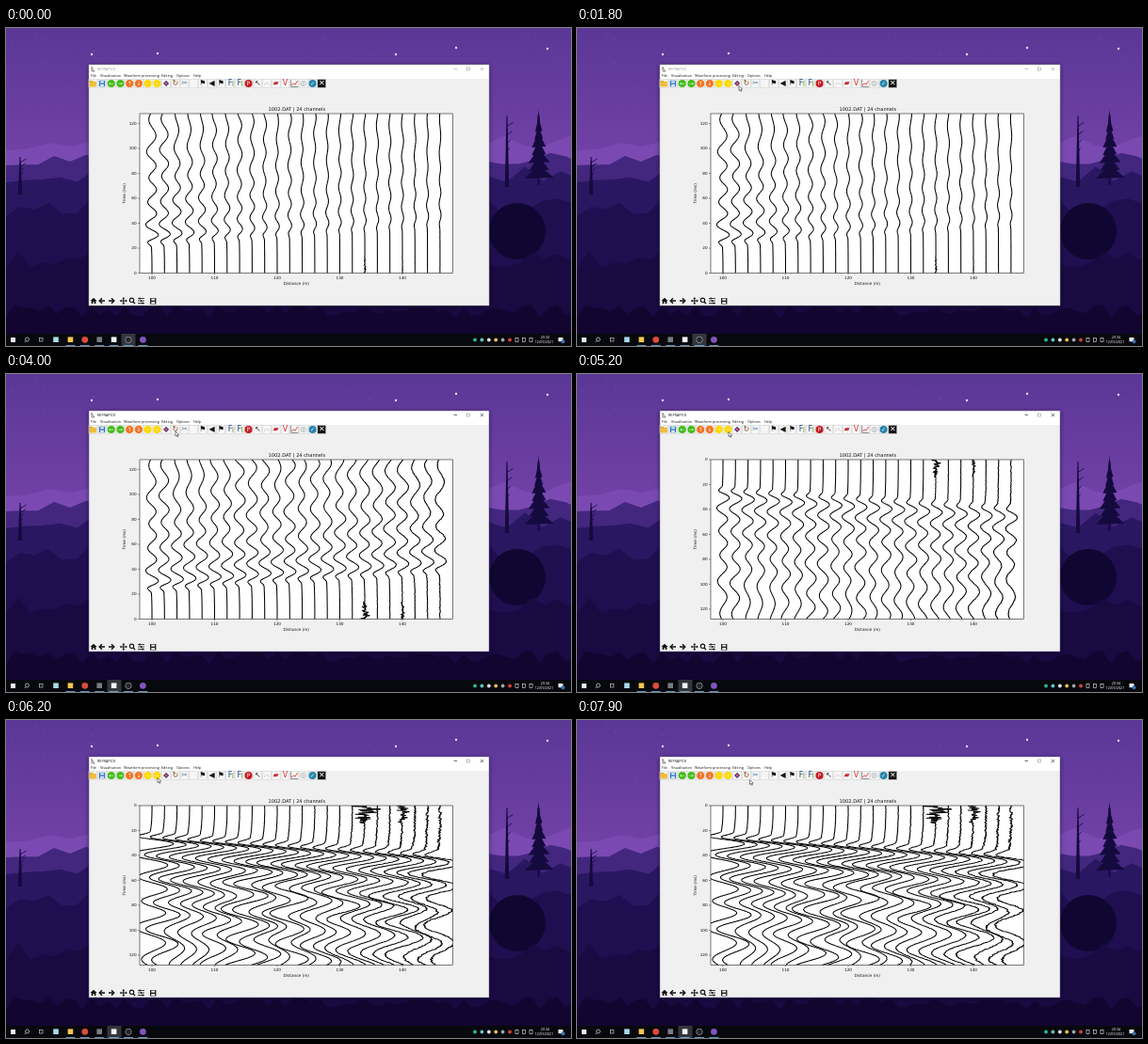
Write an HTML page with a canvas that moves like this. It is 600 px wide and 338 px high and loops after 8 s.

```html
<!DOCTYPE html>
<html lang="en">
<head>
<meta charset="utf-8">
<title>Seismic traces</title>
<style>
html,body{margin:0;width:100%;height:100%;overflow:hidden;background:#1b0c3c}
canvas{display:block;width:600px;height:338px}
</style>
</head>
<body>
<canvas id="stage" width="600" height="338"></canvas>
<script>
const c = document.getElementById('stage').getContext('2d');
const SANS = '"Open Sans",sans-serif', PLOT = '"DejaVu Sans",sans-serif';
const L = 142, R = 474.5, T = 91, B = 260.5, SPAN = 128, MS = (B - T) / SPAN;
const CHANNELS = 24, RATE = 4;
const clamp = v => Math.max(0, Math.min(1, v));
const ease = k => k * k * (3 - 2 * k);

function rect(x, y, w, h, col) { c.fillStyle = col; c.fillRect(x, y, w, h); }
function frame(x, y, w, h, col, width = .6) { c.strokeStyle = col; c.lineWidth = width; c.strokeRect(x, y, w, h); }
function dot(x, y, r, col) { c.fillStyle = col; c.beginPath(); c.arc(x, y, r, 0, 7); c.fill(); }
function ring(x, y, r, col, w = .8) { c.strokeStyle = col; c.lineWidth = w; c.beginPath(); c.arc(x, y, r, 0, 7); c.stroke(); }
function trail(p) {
  c.beginPath();
  for (let i = 0; i < p.length; i += 2) c.lineTo(p[i], p[i + 1]);
}
function poly(col, ...p) { trail(p); c.fillStyle = col; c.fill(); }
function line(col, w, ...p) { trail(p); c.strokeStyle = col; c.lineWidth = w; c.stroke(); }
function text(s, x, y, size, font = SANS, align = 'left', col = '#111') {
  c.font = size + 'px ' + font; c.textAlign = align; c.textBaseline = 'middle';
  c.fillStyle = col; c.fillText(s, x, y);
}
function random(seed) {
  return () => (seed = (seed * 16807) % 2147483647) / 2147483647;
}

// Unit-gain displacement of one channel: a chirp after the first arrival plus noise
const rnd = random(4711);
function makeTrace(ch) {
  const arrival = 27 + ch * .66, a = 14.8, b = 1.2, shift = rnd() * 6;
  const hiss = .04 + .5 * (ch / CHANNELS) ** 4;
  const burst = ch == 17 ? 6 : ch == 20 ? 3 : 0;
  let rough = 0;
  return Array.from({length: SPAN * RATE + 1}, (_, i) => {
    const t = i / RATE, tau = (t - arrival) / (1 + ch * .005);
    const n = tau < 0 ? tau / a : (Math.sqrt(a * a + 4 * b * tau) - a) / (2 * b);
    const rise = ease(clamp((n + .45) / .45)), late = clamp(tau / 40);
    const wave = 7 * (.55 + .45 * Math.exp(-Math.max(0, tau) / 35)) * Math.sin(2 * Math.PI * n + .3 * late * Math.sin(shift + t / 13));
    const ripple = late * (Math.sin(t / 4 + shift) + Math.sin(t / 9 - ch * .5));
    const noise = rnd() * 2 - 1;
    rough = rough * .5 + noise * .5;
    const spike = t < 14 ? burst * noise * (.3 + .7 * noise * noise) * Math.exp(-t / 14) : 0;
    const lean = -1.2 * (1 - rise) * Math.min(1, t / arrival) ** 3;
    return rise * (wave + ripple) + lean + hiss * rough * 1.5 + spike;
  });
}
const traces = Array.from({length: CHANNELS}, (_, ch) => makeTrace(ch));

function hill(col, seed, y, height, step) {
  const r = random(seed);
  c.fillStyle = col; c.beginPath(); c.moveTo(0, 338);
  for (let x = 0; x <= 600 + step; x += step) c.lineTo(x, y - r() * height);
  c.lineTo(620, 338); c.fill();
}
function pine(x, y, h, w, col) {
  rect(x - 1, y, 2, h + 8, col);
  for (let i = 1; i < 9; i++) {
    const k = i / 8, s = w * k * (i % 2 ? .8 : 1);
    poly(col, x, y + h * (k - .22), x + s, y + h * k, x - s * .9, y + h * k + 1);
  }
}
function bareTree(x, y, h, col) {
  poly(col, x - .5, y, x + .5, y, x + 2.2, y + h, x - 2.2, y + h);
  for (let k = .15; k < .7; k += .12) {
    const side = Math.sin(k * 50) * 7;
    line(col, .8, x, y + h * k, x + side, y + h * k - 4);
  }
}
function wallpaper() {
  const sky = c.createLinearGradient(0, 0, 0, 150);
  sky.addColorStop(0, '#5b3796');
  sky.addColorStop(1, '#7442a8');
  rect(0, 0, 600, 338, sky);
  const r = random(12);
  for (let i = 0; i < 16; i++) dot(r() * 600, r() * 75, .4, '#a982cc');
  for (const [x, y] of [[91, 28], [161, 27], [414, 28], [478, 21], [575, 22]]) dot(x, y, 1.2, '#ecd6fa');
  hill('#7a4ab2', 31, 130, 18, 23);
  hill('#43277f', 8, 146, 15, 17);
  hill('#2a1762', 77, 164, 17, 19);
  bareTree(532, 93, 76, '#150a3d');
  pine(565.5, 93, 66, 16, '#150a3d');
  bareTree(15, 137, 40, '#150a3d');
  hill('#1f0f50', 19, 200, 20, 15);
  dot(543, 216, 30, '#100632');
  hill('#190a42', 53, 255, 18, 13);
  hill('#120530', 91, 308, 14, 9);
}

// Tool buttons: glyph, ink, and the disc behind it if there is one
const tools = [
  ['folder'], ['disk', '#2a78c8'], ['←', '#fff', '#43bd18'], ['→', '#fff', '#43bd18'],
  ['↑', '#fff', '#f4711f'], ['↓', '#fff', '#f4711f'], ['−', '#fff3a0', '#ffd800'], ['+', '#fff3a0', '#ffd800'],
  ['◆', '#3e2b78'], ['↻', '#7a4312'], ['✂', '#54779e'], [''], ['⚑', '#111'], ['◀', '#111'], ['⚑', '#111'],
  ['F', '#244b87'], ['F', '#244b87'], ['P', '#fff', '#c51820'], ['↖', '#333'], ['⌒', '#bbb'],
  ['▰', '#c62f3c'], ['V', '#d62e2e'], ['chart'], ['◎', '#8c8f96'], ['✓', '#fff', '#2685ad'], ['✕', '#fff']
];
function disk(x, y, col) {
  rect(x - 3.2, y - 3.2, 6.4, 6.4, col);
  rect(x - 1.9, y - 2.6, 3.8, 2, '#eee'); rect(x - 1.9, y + .8, 3.8, 2, '#eee');
}
function tool([glyph, ink, disc], i) {
  const x = 92.3 + i * 9.72, y = 59;
  rect(x - 4.4, y - 4.4, 8.8, 8.8, glyph == '✕' ? '#111' : '#f6f6f6');
  frame(x - 4.4, y - 4.4, 8.8, 8.8, '#cfcfcf', .5);
  if (disc) dot(x, y, 4, disc);
  if (glyph == 'folder') {
    rect(x - 3.8, y - 3, 4, 2, '#d8a72a'); rect(x - 3.8, y - 2, 7.4, 5.5, '#f0bd3a');
  } else if (glyph == 'disk') disk(x, y, ink);
  else if (glyph == 'chart') {
    line('#666', .7, x - 3.5, y - 4, x - 3.5, y + 3.5, x + 4, y + 3.5);
    line('#df3b37', .9, x - 3, y + 2, x - 1, y, x + 1, y + 1, x + 3.5, y - 3);
  } else text(glyph, x, y + .3, disc ? 6 : 8, PLOT, 'center', ink);
  if (glyph == 'F') line('#89b94e', 1, x + 2.8, y - 3, x + 2.8, y + 3);
  if (glyph == '◆') dot(x, y, 1.4, '#d65c62');
}

function navigation() {
  const k = '#111', y = 290;
  poly(k, 89.5, y, 93, y - 3.3, 96.5, y); rect(90.7, y, 4.7, 3, k); rect(92.4, y + 1, 1.3, 2, '#f0f0f0');
  for (const [x, d] of [[102, 1], [112, -1]]) {
    line(k, 1.5, x + 3 * d, y, x - 2 * d, y);
    line(k, 1.4, x, y - 2.8, x - 2.8 * d, y, x, y + 2.8);
  }
  for (let i = 0; i < 4; i++) {
    c.save(); c.translate(124.8, y); c.rotate(i * Math.PI / 2);
    line(k, 1, 0, 0, 3, 0); poly(k, 4, 0, 2.3, 1.5, 2.3, -1.5);
    c.restore();
  }
  ring(133.5, y - .7, 2.2, k, 1.1); line(k, 1.3, 135, y + 1, 137, y + 3);
  for (let i = -1; i < 2; i++) {
    line(k, .8, 140, y + i * 2.5, 147, y + i * 2.5);
    rect(143 + i * 1.5, y + i * 2.5 - 1, 1.2, 2, k);
  }
  disk(156.2, y + .2, '#222');
}

function appWindow(active) {
  c.save();
  c.shadowColor = '#0008'; c.shadowBlur = 5; c.shadowOffsetY = 1;
  rect(88, 39, 425, 256, '#f0f0f0');
  c.restore();
  rect(88, 39, 425, 15, '#fff');
  const ink = active ? '#111' : '#999';
  line('#555', .7, 91, 41, 91, 46, 94, 46, 91, 42);
  text('REFRAPICK', 97, 43.6, 3.8, SANS, 'left', ink);
  line(ink, .6, 475.5, 43.5, 479, 43.5);
  frame(489.5, 42, 3, 3, '#999');
  line(ink, .6, 503.7, 42, 507, 45.2); line(ink, .6, 507, 42, 503.7, 45.2);
  const menu = {File: 90, Visualisation: 100, 'Waveform processing': 125, Editing: 165, Options: 181, Help: 199};
  for (const name in menu) text(name, menu[name], 51.2, 3.75);
  tools.forEach(tool);
  navigation();
  frame(88, 39, 425, 256, active ? '#6c5a9c' : '#aaa', .5);
}

function plot(norm, down, gain) {
  const yOf = t => down ? T + t * MS : B - t * MS;
  const xOf = d => 155 + (d - 100) * 6.65;
  rect(L, T, R - L, B - T, '#fff');
  c.save();
  c.beginPath(); c.rect(L, T, R - L, B - T); c.clip();
  c.lineJoin = 'round'; c.strokeStyle = '#000'; c.lineWidth = 1.05;
  traces.forEach((trace, ch) => {
    const x = xOf(100 + ch * 2), k = gain * (norm ? 1 : .13 + .87 * Math.exp(-ch / 7));
    c.beginPath();
    trace.forEach((d, i) => c.lineTo(x + d * k, yOf(i / RATE)));
    c.stroke();
  });
  c.restore();
  frame(L, T, R - L, B - T, '#222');
  text('1002.DAT | 24 channels', 308.8, 86.3, 5.1, PLOT, 'center');
  for (let d = 100; d <= 140; d += 10) {
    line('#222', .5, xOf(d), B, xOf(d), B + 1.8);
    text(d, xOf(d), 265.6, 4.2, PLOT, 'center');
  }
  for (let t = 0; t <= 120; t += 20) {
    line('#222', .5, L, yOf(t), L - 1.8, yOf(t));
    text(t, 138.7, yOf(t) + .3, 4.2, PLOT, 'right');
  }
  text('Distance (m)', 308.3, 271.8, 4.25, PLOT, 'center');
  c.save(); c.translate(125.7, 175.8); c.rotate(-Math.PI / 2);
  text('Time (ms)', 0, 0, 4.25, PLOT, 'center');
  c.restore();
}

function taskbar(active) {
  rect(0, 325, 600, 13, '#08090e');
  rect(active ? 107.5 : 122.5, 325, 15, 13, '#34363d');
  rect(5, 329, 5, 5, '#e8edf3');
  ring(22.5, 331, 2, '#ddd', .7); line('#ddd', .7, 21, 332.5, 19.6, 334);
  frame(35.5, 329.5, 3.5, 3.5, '#ddd');
  ['#a9d9e9', '#f3c64e', '#dc4b3e', '#777b82', '#f5f5f5', '#aaa', '#8155bd'].forEach((col, i) => {
    const x = 53 + i * 15.4;
    if (i == 2 || i > 4) dot(x, 331.3, 3.4, col); else rect(x - 2.8, 328.4, 5.6, 5.6, col);
    if (i == 5) dot(x, 331.3, 2.8, '#25262b');
    if (i) rect(x - 5, 337.2, 10, .8, '#78b8ea');
  });
  ['#2bb885', '#62c3c2', '#dfdfdf', '#e5bf54', '#9ca5aa', '#d04538']
    .forEach((col, i) => dot(498 + i * 7.4, 331.5, 1.9, col));
  for (let x = 541; x < 560; x += 7.5) frame(x, 329.5, 3, 4, '#eee');
  text('20:34', 572.5, 328.8, 3.7, SANS, 'center', '#fff');
  text('12/05/2021', 571.5, 334.2, 3.7, SANS, 'center', '#fff');
  rect(586.5, 329, 5, 4.2, '#eee'); dot(591.5, 333.2, 2, '#3a78b8');
}

// Each stop: arrival time, x, y; the pointer takes up to a second to get there
const stops = [[1400, 172, 61.5], [3000, 174, 62], [3700, 180, 61], [4900, 161, 61.5], [6800, 154.5, 61], [7900, 183.5, 63.5]];
function pointer(t) {
  let x = 131, y = 331;
  for (const [at, sx, sy] of stops) {
    const k = ease(clamp((t - at + 600) / 600));
    x += (sx - x) * k; y += (sy - y) * k;
  }
  const shape = [0, 0, 0, 5, 1.2, 4, 2, 5.9, 2.9, 5.5, 2.1, 3.7, 3.6, 3.6, 0, 0];
  c.save();
  c.translate(x, y);
  poly('#fff', ...shape); line('#111', .5, ...shape);
  c.restore();
}

function draw() {
  const t = performance.now() % 8000;
  const normalised = t >= 2500, down = t >= 4100;
  // four clicks up, then one back down
  const clicks = t > 7250 ? 3 : Math.max(0, Math.min(4, Math.floor((t - 5050) / 350)));
  wallpaper();
  appWindow(normalised);
  plot(normalised, down, 1.5 ** clicks);
  taskbar(normalised);
  if (t > 800) pointer(t);
  requestAnimationFrame(draw);
}
draw();
</script>
</body>
</html>
```
